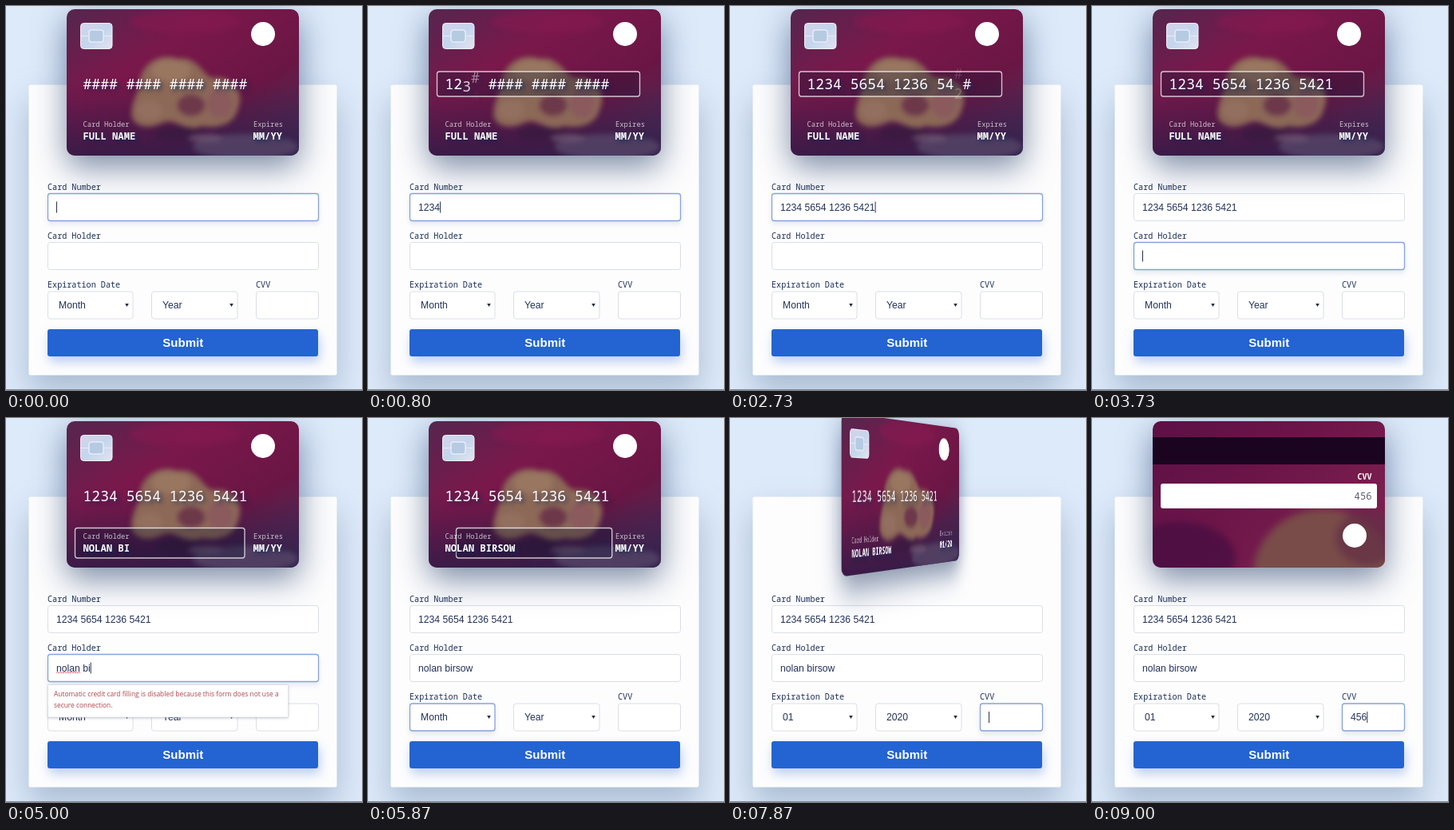
An HTML page that plays this animation: 446x480 px, repeating every 9070 ms.

```html
<!DOCTYPE html>
<html lang="en">
<head>
<meta charset="utf-8">
<title>Card form</title>
<style>
html, body { margin: 0; width: 100%; height: 100%; overflow: hidden; background: #ddeafa; }
svg { position: absolute; display: block; }
text { white-space: pre; }
#page { left: 0; top: 0; width: 446px; height: 480px; }
.side {
  left: 76px; top: 4px; width: 291px; height: 183px;
  border-radius: 10px; overflow: hidden;
  box-shadow: 0 14px 40px rgba(14, 42, 90, .55);
}
.label { font: 500 10.15px 'Noto Sans Mono', monospace; fill: #1c2f58; }
.field { font: 12.2px 'Liberation Sans', Arial, sans-serif; fill: #24325c; }
.submit { font: bold 15px 'Liberation Sans', Arial, sans-serif; fill: #fff; }
.hint { font: 8.4px 'Open Sans', sans-serif; fill: #b0464c; }
.digits { font: 500 18px 'Noto Sans Mono', monospace; fill: #fff; }
.name { font: 600 12.19px 'Noto Sans Mono', monospace; fill: #fff; }
.small { font: 500 8.8px 'Noto Sans Mono', monospace; fill: #fff; opacity: .72; }
.cvvLabel { font: 600 10px 'Noto Sans Mono', monospace; fill: #fff; }
.cvv { font: 12.19px 'Noto Sans Mono', monospace; fill: #5b6072; }
.digits, .name { text-shadow: 3px 3px 5px rgba(14, 42, 90, .7); }
</style>
</head>
<body>
<svg id="page" viewBox="0 0 446 480"></svg>
<svg id="back" class="side" viewBox="76 4 291 183"></svg>
<svg id="front" class="side" viewBox="76 4 291 183"></svg>
<script>
const LOOP = 9070;
const NUMBER = '1234 5654 1236 5421';
const HOLDER = 'nolan birsow';
const CVV = '456';
const FLIP_AT = 7440, FLIP_TIME = 800;
const [page, front, back] = ['page', 'front', 'back'].map(id => document.getElementById(id));

// Drawing helpers
function el(parent, tag, attrs = {}, content) {
  const node = document.createElementNS('http://www.w3.org/2000/svg', tag);
  for (const key in attrs) node.setAttribute(key, attrs[key]);
  if (content !== undefined) node.textContent = content;
  return parent.appendChild(node);
}
const text = (parent, cls, x, y, content) => el(parent, 'text', { class: cls, x, y }, content);
const rect = (parent, x, y, width, height, rx, attrs) =>
  el(parent, 'rect', { x, y, width, height, rx, ...attrs });
const show = (node, on) => { node.style.display = on ? '' : 'none'; };

function gradient(parent, id, x2, y2, colors) {
  const g = el(parent, 'linearGradient', { id, x2, y2 });
  colors.forEach((color, i) =>
    el(g, 'stop', { offset: i / (colors.length - 1), 'stop-color': color }));
}

// Timing helpers
const clamp = v => Math.min(1, Math.max(0, v));
const mix = (a, b, p) => a + (b - a) * p;
function bezier(x1, y1, x2, y2) {
  const at = (a, b, s) => 3 * (1 - s) * (1 - s) * s * a + 3 * (1 - s) * s * s * b + s * s * s;
  return x => {
    x = clamp(x);
    if (x === 0 || x === 1) return x;
    let lo = 0, hi = 1;
    for (let i = 0; i < 22; i++) {
      const mid = (lo + hi) / 2;
      if (at(x1, x2, mid) < x) lo = mid; else hi = mid;
    }
    return at(y1, y2, lo);
  };
}
const swing = bezier(.71, .03, .56, .85);
const easeInOut = bezier(.42, 0, .58, 1);

// Key presses
const digitKeys = [];
for (let i = 0; i < 16; i++) digitKeys.push(i < 9 ? 250 + i * 140 : 1800 + (i - 9) * 150);
const numberKeys = [];
[...NUMBER].forEach((c, i) => numberKeys.push(digitKeys[i - Math.floor(i / 5)] ?? 0));
const holderKeys = [...HOLDER].map((c, i) => i < 8 ? 3900 + i * 100 : 5050 + (i - 8) * 120);
const cvvKeys = [8450, 8620, 8790];
const MONTH_SET = 5900, YEAR_SET = 6550;

const updates = [];

// One text slides up and out while the other takes its place
function swap(parent, cls, x, y, from, to, key, dx = 0, dy = 15) {
  const a = text(parent, cls, x, y, from), b = text(parent, cls, x, y, to);
  updates.push(t => {
    const out = easeInOut((t - key) / 250), enter = easeInOut((t - key - 100) / 250);
    a.setAttribute('opacity', 1 - out);
    a.setAttribute('transform', `translate(0 ${-15 * out})`);
    b.setAttribute('opacity', enter);
    b.setAttribute('transform', `translate(${dx * (1 - enter)} ${dy * (1 - enter)})`);
  });
}

// Form
rect(page, 28.5, 98.5, 386, 363, 2, {
  fill: '#fdfdfe', style: 'filter: drop-shadow(0 20px 20px rgba(90,116,148,.4))'
});
rect(page, 0, 479, 446, 1, 0, { fill: '#7f8b9a' });
text(page, 'label', 52, 230, 'Card Number');
text(page, 'label', 52, 291, 'Card Holder');
text(page, 'label', 52, 352, 'Expiration Date');
text(page, 'label', 313, 352, 'CVV');

const pen = document.createElement('canvas').getContext('2d');
pen.font = "12.2px 'Liberation Sans', Arial, sans-serif";
const caret = rect(page, 0, 0, 1, 14, 0, { fill: '#2a3152' });

function field(x, y, w, pad, start, end, value, keys) {
  const box = rect(page, x + .5, y + .5, w, 34, 3, { fill: '#fff' });
  const label = text(page, 'field', x + pad, y + 21.5, '');
  updates.push(t => {
    const focused = t >= start && t < end;
    box.setAttribute('stroke', focused ? '#86a3dc' : '#dadee7');
    box.setAttribute('stroke-width', focused ? 1.3 : 1);
    box.style.filter = focused ? 'drop-shadow(0 4px 3px rgba(32,56,117,.1))' : '';
    const shown = value(t);
    if (label.textContent !== shown) label.textContent = shown;
    if (!focused || !keys) return;
    const last = Math.max(start, ...keys.filter(k => k <= t));
    show(caret, Math.floor((t - last) / 500) % 2 === 0);
    caret.setAttribute('x', x + pad + pen.measureText(shown).width);
    caret.setAttribute('y', y + 10.5);
  });
}
const typed = (str, keys) => t => str.slice(0, keys.filter(k => k <= t).length);
const chosen = (before, after, key) => t => t < key ? before : after;

updates.push(() => show(caret, false));
field(52, 234, 339, 11, 0, 3650, typed(NUMBER, numberKeys), numberKeys);
field(52, 295, 339, 11, 3650, 5650, typed(HOLDER, holderKeys), holderKeys);
field(52, 356.5, 106.5, 14, 5650, 6250, chosen('Month', '01', MONTH_SET));
field(182, 356.5, 107.5, 14, 6250, FLIP_AT, chosen('Year', '2020', YEAR_SET));
field(313, 356.5, 78, 11, FLIP_AT, LOOP, typed(CVV, cvvKeys), cvvKeys);
for (const x of [151.5, 282.5]) {
  el(page, 'path', { d: `M${x - 2.3} 372h4.6l-2.3 4z`, fill: '#222b45' });
}

rect(page, 52, 404, 339, 34, 3, {
  fill: '#2364d2', style: 'filter: drop-shadow(2px 7px 7px rgba(35,100,210,.3))'
});
text(page, 'submit', 196.3, 426, 'Submit');

const wordWidth = pen.measureText(HOLDER.split(' ')[0]).width;
let wave = 'M63 319';
for (let x = 0; x < wordWidth - 2; x += 3) wave += 'l1.5 -1.5l1.5 1.5';
const squiggle = el(page, 'path', { d: wave, fill: 'none', stroke: '#d8485a', 'stroke-width': .8 });

const hint = el(page, 'g');
rect(hint, 52.5, 333.5, 301, 40.5, 1, {
  fill: '#fff', stroke: '#d8dae0', 'stroke-width': .7,
  style: 'filter: drop-shadow(0 1px 1.5px rgba(40,50,80,.25))'
});
text(hint, 'hint', 60, 348, 'Automatic credit card filling is disabled because this form does not use a');
text(hint, 'hint', 60, 362, 'secure connection.');
page.append(caret);
updates.push(t => {
  show(hint, t >= holderKeys[0] && t < 5650);
  show(squiggle, t >= holderKeys[5] && t < 5650);
});

// Card front
gradient(front, 'wine', 1, 1, ['#55264f', '#7a184b', '#6a1644', '#46345c']);
gradient(front, 'dusk', 0, 1, ['#2d1c4800', '#2d1c4800', '#2d1c48cc']);
gradient(front, 'silver', 1, 1, ['#d6d4ea', '#c3d5ec', '#e3e4f2']);
rect(front, 76, 4, 291, 183, 0, { fill: 'url(#wine)' });
rect(front, 76, 4, 291, 183, 0, { fill: 'url(#dusk)' });

const ink = el(front, 'g', { style: 'filter: blur(3px)' });
const blob = (parent, cx, cy, rx, ry, fill, opacity = 1) =>
  el(parent, 'ellipse', { cx, cy, rx, ry, fill, opacity });
blob(ink, 300, 176, 66, 16, '#574768', .8);
blob(ink, 225, 20, 70, 14, '#861a50', .6);
el(ink, 'path', {
  fill: '#8c6857',
  d: 'M158 140C154 122 168 108 168 92C172 70 195 58 215 66C240 62 245 85 258 90' +
     'C285 86 300 108 290 130C285 150 262 153 245 150C225 160 212 138 196 146C180 154 164 152 158 140Z'
});
blob(ink, 207, 81, 25, 14, '#9c7a63', .8);
blob(ink, 180, 130, 16, 12, '#967264', .7);
blob(ink, 232, 124, 17, 13, '#673148', .85);
blob(ink, 268, 122, 16, 18, '#8a5760', .8);
blob(ink, 217, 160, 30, 9, '#3a1b40', .85);
blob(ink, 250, 165, 22, 5, '#725a76', .7);

rect(front, 93.5, 21.5, 39.5, 32, 4, { fill: 'url(#silver)', stroke: '#eef0f8', 'stroke-width': 1 });
rect(front, 104, 30, 18, 15, 3, { fill: '#b5cbe2', stroke: '#e8ecf6', 'stroke-width': 1.5 });
el(front, 'path', { d: 'M94 37.5h10M122 37.5h10', stroke: '#e8ecf6', 'stroke-width': 1 });
blob(front, 322, 35, 15, 15, '#fff');

const focusBox = rect(front, 0, 0, 0, 0, 3, {
  fill: 'rgba(8,20,47,.28)', stroke: 'rgba(255,255,255,.75)', 'stroke-width': 1.35
});

let digit = 0;
[...NUMBER].forEach((c, i) => {
  if (c !== ' ') swap(front, 'digits', 96.5 + i * 10.83, 104, '#', c, digitKeys[digit++]);
});
text(front, 'small', 96.5, 151, 'Card Holder');
text(front, 'small', 310, 151, 'Expires');
swap(front, 'name', 96.5, 167, 'FULL NAME', '', holderKeys[0]);
[...HOLDER.toUpperCase()].forEach((c, i) =>
  swap(front, 'name', 96.5 + i * 7.31, 167, '', c, holderKeys[i], 10, 0));
swap(front, 'name', 309.5, 167, 'MM', '01', MONTH_SET);
text(front, 'name', 309.5 + 14.62, 167, '/');
swap(front, 'name', 309.5 + 21.93, 167, 'YY', '20', YEAR_SET);

// Highlight travels between parts of the card: time, x, y, width, height, opacity
const stops = [
  [-999, 76, 4, 291, 183, 0],
  [60, 86.5, 82, 254, 31, 1],
  [3730, 86.5, 137.5, 212.5, 37.5, 1],
  [5750, 306.7, 137.5, 53.5, 37.5, 1],
  [7480, 76, 4, 291, 183, 0]
];
updates.push(t => {
  const i = stops.findLastIndex(s => s[0] <= t);
  const to = stops[i], from = stops[Math.max(0, i - 1)];
  const p = swing((t - to[0]) / 350);
  ['x', 'y', 'width', 'height'].forEach((key, n) =>
    focusBox.setAttribute(key, mix(from[n + 1], to[n + 1], p)));
  focusBox.setAttribute('opacity', mix(from[5], to[5], easeInOut((t - to[0]) / 300)));
});

// Card back
gradient(back, 'plum', 1, .7, ['#5c1046', '#6d1549', '#7d2150']);
rect(back, 76, 4, 291, 183, 0, { fill: 'url(#plum)' });
const haze = el(back, 'g', { style: 'filter: blur(5px)' });
blob(haze, 110, 175, 70, 45, '#430d40', .7);
blob(haze, 290, 196, 88, 82, '#7a5049', .95);
blob(haze, 345, 150, 40, 34, '#633047', .7);
rect(back, 76, 24, 291, 34, 0, { fill: '#1b0420' });
text(back, 'cvvLabel', 332.5, 77, 'CVV');
rect(back, 86, 82, 271, 31, 3, { fill: '#fff' });
blob(back, 329, 147, 15, 15, '#fff');
const code = text(back, 'cvv', 350.5, 102, '');
code.setAttribute('text-anchor', 'end');
const codeAt = typed(CVV, cvvKeys);

updates.push(t => {
  code.textContent = codeAt(t);
  const p = swing((t - FLIP_AT) / FLIP_TIME);
  const depth = mix(1354, 677, p), angle = 180 * p;
  const turn = a => `perspective(${depth}px) rotateY(${a}deg)`;
  front.style.transform = turn(angle);
  back.style.transform = turn(angle - 180);
  show(front, angle < 90);
  show(back, angle >= 90);
});

const begin = performance.now();
function frame() {
  const t = (performance.now() - begin) % LOOP;
  updates.forEach(update => update(t));
  requestAnimationFrame(frame);
}
frame();
</script>
</body>
</html>
```
